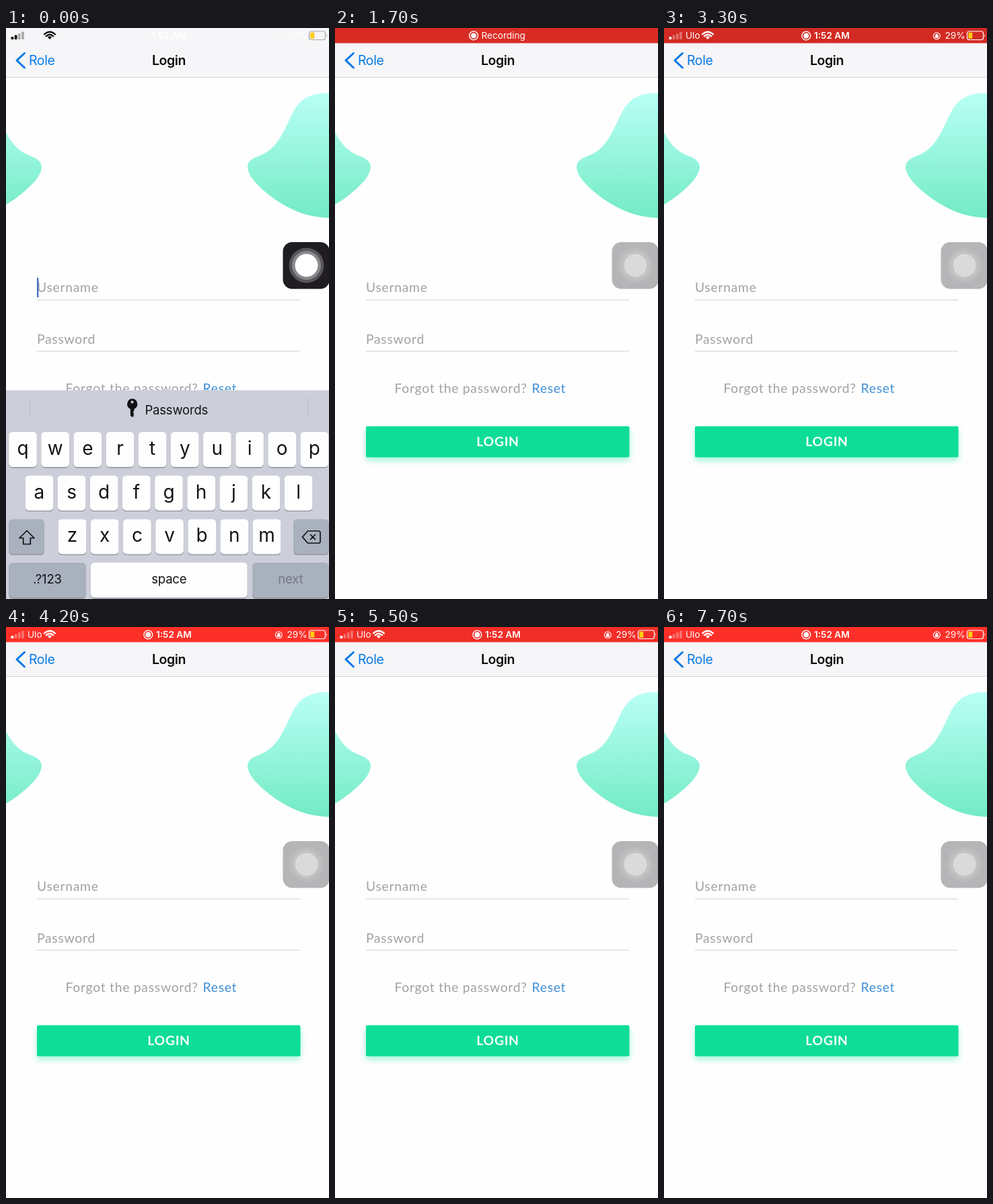
An HTML page for the animation above (7800 ms loop, 480 by 848 pixels).

```html
<!DOCTYPE html>
<html lang="en">
<head>
<meta charset="utf-8">
<title>Login form</title>
<style>
  html, body { margin: 0; width: 100%; height: 100%; overflow: hidden; background: #fefefe; }
  svg { display: block; width: 480px; height: 848px; }
  text { font-family: Inter, Roboto, sans-serif; }
  .mid { text-anchor: middle; }
  .nav { font-size: 19.5px; letter-spacing: -.4px; }
  .status { font-size: 13.6px; }
  .form { font-family: Lato, "Open Sans", sans-serif; font-size: 19.3px; letter-spacing: .75px; fill: #a3a0a6; }
  .key { font-size: 28px; fill: #131316; }
  .small { font-size: 18.5px; letter-spacing: -.2px; fill: #131316; }
  .line { fill: none; stroke-linejoin: round; stroke-linecap: round; }
</style>
</head>
<body>
<svg viewBox="0 0 480 848">
  <defs>
    <linearGradient id="mint" x1="0" y1="0" x2="0" y2="1">
      <stop offset="0" stop-color="#b9fff5"/>
      <stop offset="1" stop-color="#73ebc5"/>
    </linearGradient>
    <linearGradient id="textFade" gradientUnits="userSpaceOnUse" x1="0" y1="0" x2="96" y2="0">
      <stop offset="0" stop-color="#85878e"/>
      <stop offset=".2" stop-color="#25262a"/>
      <stop offset=".7" stop-color="#25262a"/>
      <stop offset="1" stop-color="#85878e"/>
    </linearGradient>
    <filter id="glow" x="-10%" y="-60%" width="120%" height="240%">
      <feDropShadow dx="0" dy="5" stdDeviation="5" flood-color="#07de97" flood-opacity=".35"/>
    </filter>
    <path id="blob" fill="url(#mint)" d="M490 97C452 94 436 105 424 130C410 160 401 180 378 189C364 194 359 199 359 207C360 221 376 237 399 254C428 274 455 283 490 282Z"/>
    <g id="wifi" class="line" stroke="currentColor" stroke-width="2.4" stroke-linecap="butt">
      <path d="M57 9.3Q65 2.2 73 9.3M59.8 12.2Q65 7.4 70.2 12.2"/>
      <path d="M65 17L61.8 13.6Q65 11 68.2 13.6Z" fill="currentColor" stroke="none"/>
    </g>
    <g id="record">
      <circle r="6.4" fill="none" stroke="#fff" stroke-width="1.4"/>
      <circle r="3.9" fill="#fff"/>
    </g>
    <g id="battery">
      <rect x="450.5" y="5" width="24" height="12.5" rx="3" fill="none" stroke="currentColor" stroke-width="1.2"/>
      <path d="M476.3 9v4.6q2-2.3 0-4.6" fill="currentColor"/>
      <rect x="452.3" y="6.8" width="6" height="9" rx="1" fill="#ffcc13"/>
    </g>
  </defs>

  <rect width="480" height="848" fill="#fefefe"/>
  <use href="#blob"/>
  <use href="#blob" transform="matrix(-1 0 0 1 412 0)"/>

  <rect width="480" height="73" fill="#f6f5f7"/>
  <rect y="73" width="480" height="1" fill="#d3d2d5"/>
  <path class="line" d="M27.5 37.5L16 48.2L27.5 59" stroke="#0a79e6" stroke-width="3"/>
  <text class="nav" x="34" y="55" fill="#0a79e6">Role</text>
  <text class="nav mid" x="242" y="55" font-weight="600" fill="#0b0b0d">Login</text>

  <text class="form" x="46" y="392">Username</text>
  <text class="form" x="46" y="468.5">Password</text>
  <path d="M46 403.8H437M46 480H437" stroke="#dfdfe1" stroke-width="1.4"/>
  <rect id="caret" x="46" y="371" width="2.3" height="29" fill="#3f6dbd"/>
  <text class="form" x="88.5" y="542">Forgot the password?</text>
  <text class="form" x="292.5" y="542" style="fill:#3f8fd6">Reset</text>
  <rect x="46" y="591.5" width="391.5" height="46" rx="2" fill="#07dd97" filter="url(#glow)"/>
  <text class="form mid" x="242" y="621" style="fill:#fff;font-weight:700">LOGIN</text>

  <g id="idle" color="#111">
    <g class="bars"></g>
    <use href="#wifi"/>
    <g fill="#fff">
      <text class="status mid" x="242" y="16" font-weight="600">1:52 AM</text>
      <text class="status" x="417" y="16">29%</text>
      <circle cx="405" cy="11.5" r="5" fill="none" stroke="#fff"/>
    </g>
    <use href="#battery" color="#a9a8aa"/>
  </g>
  <rect id="red" width="480" height="22.5"/>
  <g id="recording">
    <use href="#record" x="206" y="11.3"/>
    <text class="status" x="217.5" y="16.3" fill="#fff">Recording</text>
  </g>
  <g id="live" color="#fff" fill="#fff">
    <g class="bars"></g>
    <text class="status" x="32" y="16.3">Ulo</text>
    <use href="#wifi"/>
    <use href="#record" x="211.3" y="11.5"/>
    <text class="status" x="223" y="16.3" font-weight="600">1:52 AM</text>
    <circle cx="405.3" cy="11.8" r="5" fill="none" stroke="#fff" stroke-width="1.1"/>
    <path d="M403 11.2h4.6v3.2h-4.6zM404 11v-2h2.6v2" stroke="#fff" stroke-width=".6"/>
    <text class="status" x="417.5" y="16.3">29%</text>
    <use href="#battery"/>
  </g>

  <g id="keyboard">
    <rect width="480" height="320" fill="#cccfd9"/>
    <g id="centred">
      <path d="M35.5 12V40M448.5 12V40" stroke="#b4b7c1"/>
      <path fill="#131316" fill-rule="evenodd" d="M187.5 12.5a8 8 0 0 1 3 15.3v2.7l-2 2l2 2l-1.5 2l1.5 1.5l-3 2l-2.6-2.5V27.8a8 8 0 0 1 2.6-15.3m0 3a2 2 0 1 0 .1 0"/>
      <text class="small" x="206.5" y="36">Passwords</text>
    </g>
    <g id="shifted">
      <path d="M160.5 12V40M322.5 12V40" stroke="#b4b7c1"/>
      <text class="small" x="-1" y="36.5" style="fill:url(#textFade)">Passwords</text>
    </g>
    <g id="keys"></g>
    <path class="line" stroke="#131316" stroke-width="1.7" d="M31 208.5L42 219.5H36.3V228.5H25.7V219.5H20Z"/>
    <path class="line" stroke="#131316" stroke-width="1.7" d="M440.5 218L448.5 209H464.5Q467 209 467 211.500V224.500Q467 227 464.500 227H448.500ZM452.500 214.500L459.500 221.500M459.500 214.500L452.500 221.500"/>
  </g>

  <g id="assist">
    <rect x="411.5" y="318" width="69.5" height="69.5" rx="14" fill="#1f1c22"/>
    <circle cx="446.500" cy="352.500" r="26" fill="#fff"/>
    <circle cx="446.500" cy="352.500" r="21.500" fill="#fff"/>
    <circle cx="446.500" cy="352.500" r="17" fill="#fff"/>
  </g>
</svg>
<script>
const LOOP = 7800, STEP = 100, TOP = 538, TRAVEL = 310;
const $ = id => document.getElementById(id);
const show = (id, on) => $(id).style.display = on ? '' : 'none';
const clamp = x => Math.min(1, Math.max(0, x));
const spring = ms => {
  const x = Math.max(0, ms) * .0183;
  return 1 - (1 + x) * Math.exp(-x);
};

// Keyboard keys
function key(x, y, w, label = '', cls = 'key', fill = '#fefefe', ink = '#131316') {
  const base = cls === 'key' ? 34 : 31;
  return `<rect x="${x}" y="${y + 1.4}" width="${w}" height="52" rx="5.5" fill="#8e9099"/>
    <rect x="${x}" y="${y}" width="${w}" height="52" rx="5.5" fill="${fill}"/>
    <text class="${cls} mid" x="${x + w / 2}" y="${y + base}" style="fill:${ink}">${label}</text>`;
}
const PITCH = 48.15, ROW = 64.7, GREY = '#a9b0be';
const rowY = row => 62 + row * ROW;
let keys = '';
[['qwertyuiop', 4.2], ['asdfghjkl', 28.6], ['zxcvbnm', 77.8]].forEach(([letters, x], row) =>
  [...letters].forEach((c, i) => keys += key(x + i * PITCH, rowY(row), 41.6, c)));
keys += key(4.2, rowY(2), 52.6, '', 'small', GREY) + key(427, rowY(2), 52.6, '', 'small', GREY)
  + key(4.2, rowY(3), 114.6, '.?123', 'small', GREY)
  + key(126, rowY(3), 232.6, 'space', 'small')
  + key(366, rowY(3), 113.6, 'next', 'small', GREY, '#737a87');
$('keys').innerHTML = keys;

// Signal strength: the idle bar has two lit bars, the live one has one
document.querySelectorAll('.bars').forEach((g, n) => {
  g.innerHTML = [4, 6.5, 9, 11.5].map((h, i) =>
    `<rect x="${7.5 + i * 5.2}" y="${17 - h}" width="3.8" height="${h}" rx="1"
      fill="currentColor" opacity="${i < 2 - n ? 1 : .32}"/>`).join('');
});

const DOWN = 965, UP = 4250, DOWN_AGAIN = 4965;

function draw(t) {
  const hidden = spring(t - DOWN) - spring(t - UP) + spring(t - DOWN_AGAIN);
  const leaving = t > DOWN && t < UP || t > DOWN_AGAIN;
  $('keyboard').setAttribute('transform', `translate(0 ${TOP + TRAVEL * hidden})`);
  show('keyboard', hidden < .999);
  show('shifted', leaving);
  show('centred', !leaving);
  show('caret', !leaving);

  show('idle', t < 100);
  show('red', t >= 100);
  show('recording', t >= 100 && t < 3300);
  show('live', t >= 3300);
  const pulse = .5 + .5 * Math.cos((t - 4080) / 1750 * 2 * Math.PI);
  $('red').setAttribute('fill', `rgb(${208 + 47 * pulse},${43 + 5 * pulse},${35 + 6 * pulse})`);

  const dim = clamp((t - 300) / 500);
  const from = [1, .25, .3, 1], to = [.33, .08, .1, .4];
  [...$('assist').children].forEach((el, i) =>
    el.setAttribute('opacity', from[i] + (to[i] - from[i]) * dim));
}

const start = performance.now();
function tick() {
  const t = (performance.now() - start) % LOOP;
  draw(Math.floor(t / STEP) * STEP);
  requestAnimationFrame(tick);
}
tick();
</script>
</body>
</html>
```
